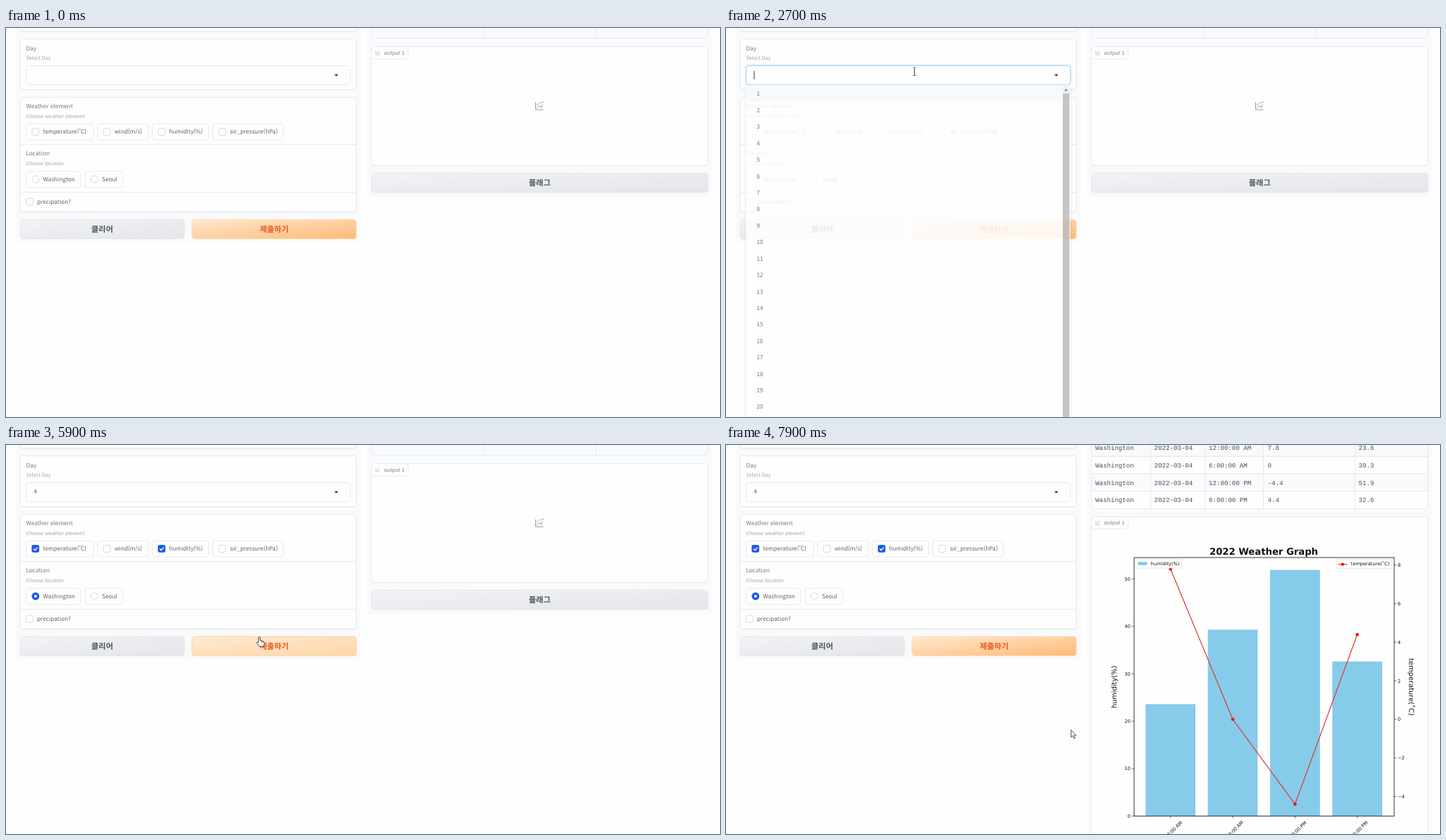
These frames come from a looping animation (1013 by 553 pixels, 8000 ms). An HTML page:

```html
<!DOCTYPE html>
<html lang="ko">
<head>
<meta charset="utf-8">
<title>Weather form</title>
<style>
  html, body { margin: 0; width: 100%; height: 100%; overflow: hidden; background: #fefdff; }
  svg { display: block; width: 1013px; height: 553px; }
  text { font-family: "Noto Sans CJK KR", "Noto Sans CJK", "Noto Sans", sans-serif; font-size: 8.25px; fill: #5d636e; text-rendering: geometricPrecision; white-space: pre; }
  .info { font-size: 7.1px; fill: #9ca3af; }
  .label { fill: #737985; }
  .button { font-size: 11.2px; font-weight: 600; fill: #4b5261; text-anchor: middle; }
  .submit { fill: #e5591c; }
  .mono { font-family: "Liberation Mono", monospace; font-size: 9.15px; fill: #4b4f57; }
  .small { font-size: 7.9px; }
  .chart text { font-family: "DejaVu Sans", sans-serif; font-size: 6.6px; fill: #111; }
  .chart .axis { font-size: 9.9px; }
  .chart .title { font-size: 13.2px; font-weight: bold; }
  .mid { text-anchor: middle; }
  .end { text-anchor: end; }
</style>
</head>
<body>
<svg id="stage" viewBox="0 0 1013 553">
  <defs>
    <linearGradient id="grey" x2="1" y2="1"><stop stop-color="#f2f3f5"/><stop offset="1" stop-color="#e3e5e9"/></linearGradient>
    <linearGradient id="orange" x2="1" y2="1"><stop stop-color="#ffe9d0"/><stop offset="1" stop-color="#fdb974"/></linearGradient>
    <linearGradient id="pale" x2="1" y2="1"><stop stop-color="#ffe9d0"/><stop offset="1" stop-color="#fed6a8"/></linearGradient>
    <filter id="shadow" x="-5%" y="-5%" width="110%" height="115%"><feDropShadow dx="0" dy="2.5" stdDeviation="2.5" flood-opacity=".13"/></filter>
  </defs>
</svg>
<script>
const LOOP = 8000, STEP = 100;
const WHITE = '#fffeff', LINE = '#e5e9ee', PANEL = '#f9fafc', BLUE = '#1d5be6';
const ROW = 23.42;
const stage = document.getElementById('stage');

const rect = (x, y, w, h, fill = WHITE, stroke = LINE, r = 4, extra = '') =>
  `<rect x="${x}" y="${y}" width="${w}" height="${h}" rx="${r}" fill="${fill}" stroke="${stroke}" ${extra}/>`;
const path = (d, stroke = LINE, fill = 'none', width = 1) =>
  `<path d="${d}" stroke="${stroke}" fill="${fill}" stroke-width="${width}"/>`;
const circle = (x, y, r, fill, stroke = 'none') =>
  `<circle cx="${x}" cy="${y}" r="${r}" fill="${fill}" stroke="${stroke}"/>`;
const text = (x, y, s, cls = '', turn = 0) =>
  `<text x="${x}" y="${y}" dy=".36em" class="${cls}" transform="rotate(${turn} ${x} ${y})">${s}</text>`;
const group = (id, body, extra = '') => `<g id="${id}" ${extra}>${body}</g>`;

const card = (x, y, w, h) =>
  rect(x, y + .8, w, h, 'none', '#eff1f4') + rect(x, y, w, h);
const button = (x, y, w, fill, label, cls = '') =>
  rect(x, y, w, 27.5, `url(#${fill})`, fill === 'grey' ? '#e3e6ea' : '#fed9b3') +
  text(x + w / 2, y + 13.8, label, 'button ' + cls);
const box = (x, y) => rect(x, y, 10, 10, WHITE, '#d5d9df', 2.5);
const pill = (x, y, w, label, mark) =>
  rect(x, y, w, 23) + mark + text(x + 24, y + 11.2, label);
const tick = (id, x, y) => group(id,
  rect(x - .3, y - .3, 10.6, 10.6, BLUE, 'none', 2.5) +
  path(`M${x + 2.4} ${y + 5.2}l2 2 3.4-4`, '#fff', 'none', 1.4));

const plotIcon = (x, y, k) => `<g transform="translate(${x} ${y}) scale(${k})">` +
  path('M-5.5-5V5.5H5.5M-3.5 3L-.5 0 1.5 1.5 4.5-2', '#868b94', 'none', .9) +
  [[-3, -2], [0, -4], [3, -4.5], [5, -5.5], [3, 1.5]].map(p => circle(...p, .8, '#868b94')).join('') + '</g>';
const chip = y => rect(518.5, y, 52, 17.5) + plotIcon(527.5, y + 8.7, .5) +
  text(536.5, y + 8.5, 'output 1', 'info label');

function form() {
  return path('M14 0H503V300q0 4-4 4H18q-4 0-4-4z', 'none', PANEL) +
    card(20, -40, 477, 44.5) + card(20, 15.5, 477, 72) + card(20, 98.5, 477, 163) +
    text(28.5, 29, 'Day', 'label') + text(28.5, 42.5, 'Select Day', 'info') +
    group('focusRing', rect(28.5, 53.5, 460, 27, 'none', '#deeffb', 4, 'stroke-width="4"')) +
    rect(28.5, 53.5, 460, 27, WHITE, LINE, 4, 'id="field"') +
    path('M465.8 65.8h5.6l-2.8 3z', 'none', '#333') +
    group('value', text(39.3, 66.5, '4')) + group('caret', path('M40 61V73', '#333')) +
    path('M20 165.5H497M20 233.5H497') +
    text(28.5, 111.5, 'Weather element', 'label') + text(28.5, 125.5, 'Choose weather element', 'info') +
    [[28.5, 96, 'temperature(˚C)'], [130, 72, 'wind(m/s)'], [207.5, 80, 'humidity(%)'], [293.5, 100, 'air_pressure(hPa)']]
      .map(([x, w, s]) => pill(x, 136, w, s, box(x + 8.3, 142.4))).join('') +
    tick('temperature', 36.8, 142.4) + tick('humidity', 215.8, 142.4) +
    text(28.5, 178.5, 'Location', 'label') + text(28.5, 192.5, 'Choose location', 'info') +
    [[28.5, 77.5, 'Washington'], [112, 54, 'Seoul']]
      .map(([x, w, s]) => pill(x, 203.8, w, s, circle(x + 13.4, 215, 5, WHITE, '#d5d9df'))).join('') +
    group('washington', circle(41.9, 215, 5.4, BLUE) + circle(41.9, 215, 2, '#fff')) +
    box(28.5, 242) + text(44, 247, 'precipation?') +
    button(20, 272.2, 233, 'grey', '클리어') +
    button(264, 272.2, 233, 'orange', '제출하기', 'submit') +
    group('hover', button(264, 272.2, 233, 'pale', '제출하기', 'submit'));
}

function emptyOutput() {
  return path('M513 0H1001V236q0 4-4 4H517q-4 0-4-4z', 'none', PANEL) +
    rect(518.5, -20, 477.5, 34.5, WHITE, '#f1f3f6') +
    card(518.5, 26.5, 477.5, 169) + button(518.5, 206.3, 477.5, 'grey', '플래그') +
    group('idle', rect(518.5, -20, 477.5, 34.5, '#f8fafc') + path('M677.5 0V14M837 0V14') +
      chip(26.5) + plotIcon(757, 110.7, 1)) +
    group('loading', '<text id="timer" x="990" y="34.5" dy=".36em" class="mono small end"></text>' +
      rect(752, 106, 8, 8, '#f5862c', 'none', 0));
}

function chart() {
  const humidity = [23.6, 39.3, 51.9, 32.6], temperature = [7.8, 0, -4.4, 4.4];
  const barX = i => 630.7 + 88.3 * i, left = v => 527.5 - 6.742 * v, right = v => 390 - 27.4 * v;
  let s = text(763, 151, '2022 Weather Graph', 'title mid');
  humidity.forEach((v, i) => {
    const hour = (i % 2 ? '6' : '12') + ':00:00 ' + (i < 2 ? 'AM' : 'PM');
    s += rect(barX(i) - 35.4, left(v), 70.8, 527.5 - left(v), '#87cbea', 'none', 0) +
      path(`M${barX(i)} 527.5v3`, '#222', 'none', .7) +
      text(barX(i) + .5, i % 2 ? 548.7 : 550.5, hour, 'mid', -45);
  });
  for (let v = 0; v <= 50; v += 10)
    s += path(`M579 ${left(v)}h-3`, '#222', 'none', .7) + text(574, left(v), v, 'end');
  for (let v = -4; v <= 8; v += 2)
    s += path(`M948 ${right(v)}h3`, '#222', 'none', .7) + text(953, right(v), String(v).replace('-', '−'));
  s += path('M' + temperature.map((v, i) => `${barX(i)} ${right(v)}`).join('L'), '#d83a2c', 'none', 1.2) +
    temperature.map((v, i) => circle(barX(i), right(v), 2.3, '#f00a0a')).join('') +
    rect(579, 160, 369, 367.5, 'none', '#222', 0, 'stroke-width=".9"') +
    rect(580.8, 162.3, 66, 12.7, '#fffc', '#ddd', 1.5, 'stroke-width=".7"') +
    rect(584.5, 166.2, 13, 4.6, '#87cbea', 'none', 0) + text(602.8, 168.5, 'humidity(%)') +
    rect(866, 162.8, 78.5, 13, '#fffc', '#ddd', 1.5, 'stroke-width=".7"') +
    path('M868 169.6h13.5', '#f01010') + circle(874.8, 169.6, 2.2, '#f00a0a') + text(886.8, 169, 'temperature(˚C)') +
    text(550.5, 344, 'humidity(%)', 'axis mid', -90) + text(973, 344, 'temperature(˚C)', 'axis mid', 90);
  return `<g class="chart">${s}</g>`;
}

function results() {
  const rows = [['12:00:00 AM', '7.8', '23.6'], ['6:00:00 AM', '0', '39.3'], ['12:00:00 PM', '-4.4', '51.9'], ['6:00:00 PM', '4.4', '32.6']];
  const columns = [524, 607.5, 685, 768.5, 897.5];
  return rect(513, -1, 488, 560, PANEL, 'none', 0) + rect(518.5, -20, 477.5, 110.8) +
    rows.map((r, i) => rect(518.5, -8.7 + 24.8 * i, 477.5, 24.8, i % 2 ? 'none' : '#f8fafc', i < 3 ? LINE : 'none', 0) +
      ['Washington', '2022-03-04', ...r].map((s, c) => text(columns[c], 3.8 + 24.8 * i, s, 'mono')).join('')).join('') +
    path([602.5, 679.5, 762.5, 892.5].map(x => `M${x} 0V90`).join('')) +
    card(518.5, 102, 477.5, 470) + chip(102) + chart();
}

function dropdown(id, names, top, bottom) {
  const row = i => `<rect x="29" y="${top + i * ROW}" width="459" height="${ROW}" fill="#f7f9fb"/>`;
  return group(id, rect(28.5, top - 1, 460, bottom - top + 1, WHITE, 'none', 4, 'filter="url(#shadow)"') +
    row(0) + `<g class="hovered">${row(0)}</g>` +
    names.map((s, i) => text(43.5, top + (i + .5) * ROW, s)).join('') +
    (id === 'days' ? rect(477, 82, 11, 490, '#f1f1f1', 'none', 0) + rect(478, 93, 9, 470, '#bdbdbd', 'none', 0) +
      path('M479.8 89.5h5.4l-2.7-3z', 'none', '#777') : ''));
}

const months = 'January February March April May June July August September October November December'.split(' ');
const days = Array.from({ length: 31 }, (_, i) => i + 1);
const pointers = {
  hand: path('M-1.3 8V1a1.3 1.3 0 0 1 2.6 0V5.2l1.7.2 1.8.5 1.4.6q.7.4.7 1.3V10L6 13.5H.4L-3.6 8.8q-.6-1.3.5-1.6.9-.2 1.8.8z', '#3b3b3b', '#fff') +
    path('M3 5.6v2.2M4.9 6.1v1.9', '#3b3b3b', 'none', .7),
  beam: path('M-2-5.5h1.4l.6.5.6-.5H2M0-5V5M-2 5.5h1.4l.6-.5.6.5H2', '#444'),
  arrow: path('M0 0V10.6l2.4-2.2 1.7 3.8 1.7-.8-1.7-3.6H7.3z', '#444', '#fff', .9)
};

stage.innerHTML += form() + emptyOutput() + group('results', results()) +
  dropdown('months', months, -1.7, 279) + dropdown('days', days, 81.8, 600) +
  Object.entries(pointers).map(([id, d]) => group(id, d)).join('');

// time, x, y, and the pointer used from then on
const track = [
  [0, 262, -30, 'arrow'], [1000, 262, -20, 'hand'], [1300, 262, 34, 'hand'], [1500, 258.5, 58, 'hand'],
  [1900, 258.5, 58, 'hand'], [2000, 260, 62, 'beam'], [2500, 267.5, 62, 'beam'], [2800, 267.5, 62, 'beam'],
  [2900, 262, 84, 'hand'], [3200, 240, 160, 'hand'], [3400, 240, 160, 'hand'], [3800, 100.5, 144, 'hand'],
  [4200, 100.5, 144, 'hand'], [4600, 236, 144, 'hand'], [4800, 236, 144, 'hand'], [5200, 68, 211, 'hand'],
  [5600, 68, 211, 'hand'], [5900, 359.5, 273, 'hand'], [6500, 366, 278, 'hand'], [6600, 425, 338, 'arrow'],
  [6700, 475.5, 382, 'arrow'], [7400, 489.5, 405, 'arrow'], [8000, 489.5, 405, 'arrow']
];

const find = id => document.getElementById(id);
const show = (id, on) => find(id).setAttribute('opacity', Number(on));
const clamp = v => Math.max(0, Math.min(1, v));
const fade = (t, open, close) => 1 - (1 - clamp(Math.min((t - open) / 200, 1 - (t - close) / 200))) ** 3;

function pointerAt(t) {
  const i = track.findIndex(k => k[0] > t) - 1;
  const [t0, x0, y0, kind] = track[i], [t1, x1, y1] = track[i + 1];
  const p = (t - t0) / (t1 - t0), e = p * p * (3 - 2 * p);
  return { x: x0 + (x1 - x0) * e, y: y0 + (y1 - y0) * e, kind };
}

function hoverRow(id, top, y) {
  const row = Math.max(0, Math.floor((y - top) / ROW));
  find(id).querySelector('.hovered').setAttribute('transform', `translate(0 ${row * ROW})`);
}

function draw(now) {
  const t = Math.floor(now % LOOP / STEP) * STEP;
  const pointer = pointerAt(t), focused = t >= 2500 && t < 4100;
  show('months', fade(t, 620, 1850));
  show('days', fade(t, 2600, 3400));
  hoverRow('months', -1.7, pointer.y);
  hoverRow('days', 81.8, pointer.y);
  show('focusRing', focused);
  find('field').setAttribute('stroke', focused ? '#a5d2ef' : LINE);
  show('caret', t >= 2500 && t < 3400);
  show('value', t >= 3400);
  show('temperature', t >= 4200);
  show('humidity', t >= 4700);
  show('washington', t >= 5200);
  show('hover', t >= 5900 && t < 6600);
  show('idle', t < 6500);
  show('loading', t >= 6500);
  find('timer').textContent = Math.max(0, (t - 6500) / 1000).toFixed(1) + 's';
  show('results', t >= 7200);
  for (const id in pointers) {
    show(id, id === pointer.kind);
    find(id).setAttribute('transform', `translate(${pointer.x} ${pointer.y})`);
  }
  requestAnimationFrame(draw);
}
requestAnimationFrame(draw);
</script>
</body>
</html>
```
